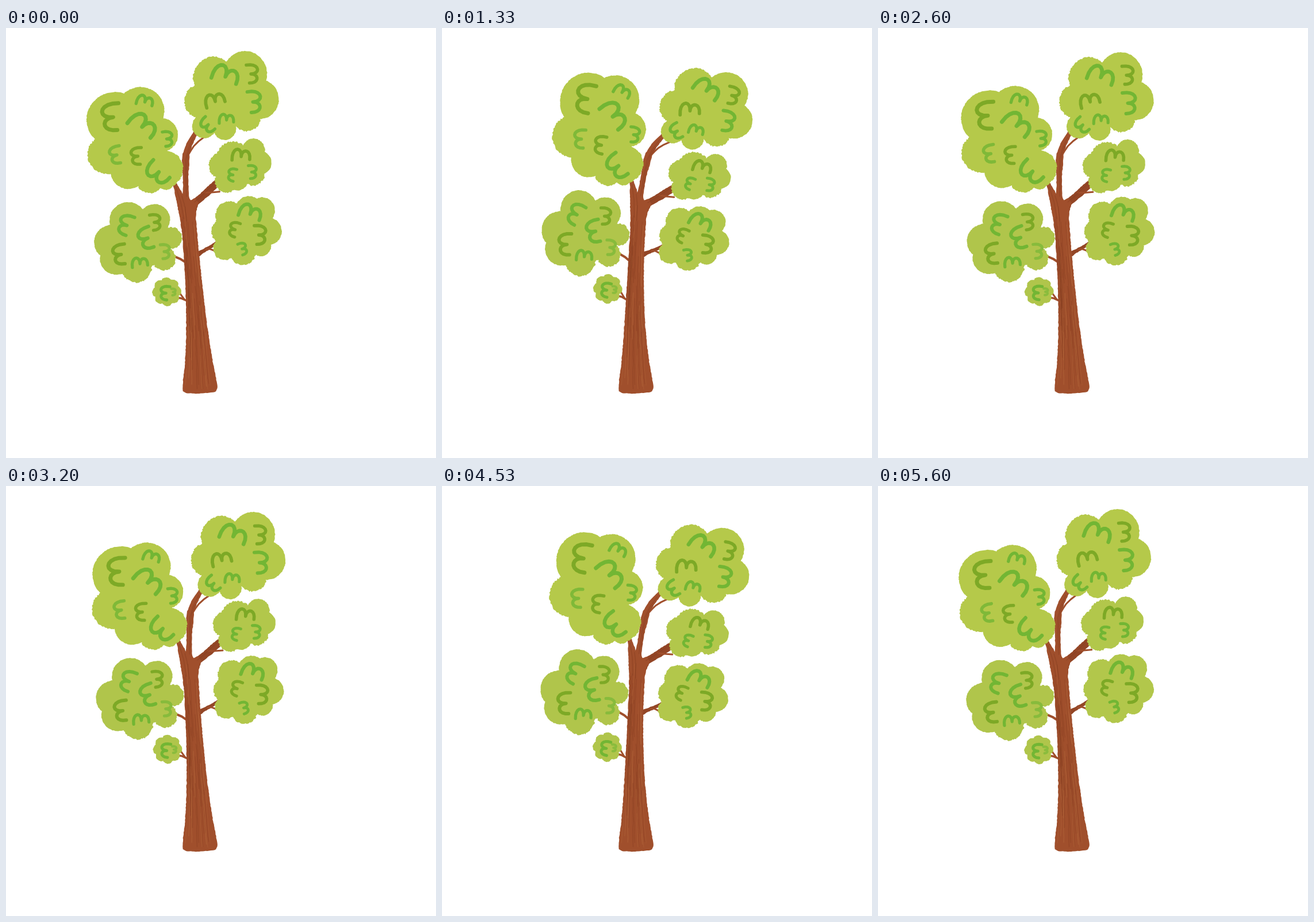
An HTML page for the animation above (5670 ms loop, 748 by 748 pixels).

```html
<!DOCTYPE html>
<html lang="en">
<head>
<meta charset="utf-8">
<title>Swaying tree</title>
<style>
html, body { margin: 0; width: 100%; height: 100%; overflow: hidden; background: #fff; }
svg { display: block; width: 100vw; height: 100vh; }
</style>
</head>
<body>
<svg id="stage" viewBox="0 0 748 748"></svg>
<script>
const FPS = 15, FRAMES = 85, SWAYS = 2;
const ROOT = { x: 337, y: 636 }, MAX_CURVE = 2.71e-4;
const BRIGHT = '#72b634', OLIVE = '#7da926', BARK = '#a04f2c', DARK_BARK = '#934626';
const stage = document.getElementById('stage');
const parts = [];

let seed = 11;
const random = () => (seed = (seed * 16807) % 2147483647) / 2147483647;
const jitter = amount => (random() - 0.5) * 2 * amount;
const lerp = (a, b, t) => a + (b - a) * t;

// Each part is a set of polylines in the upright pose, bent on every update.
function addPart(lines, attributes, closed) {
  const node = document.createElementNS('http://www.w3.org/2000/svg', 'path');
  for (const name in attributes) node.setAttribute(name, attributes[name]);
  stage.appendChild(node);
  parts.push({ node, lines, end: closed ? 'Z' : '' });
}

function addStroke(points, color, width, opacity = 1) {
  addPart([points], {
    fill: 'none', stroke: color, 'stroke-width': width, opacity,
    'stroke-linecap': 'round', 'stroke-linejoin': 'round'
  });
}

function toPoints(text) {
  return text.split(' ').map(pair => pair.split(',').map(Number));
}

function addShape(text, color) {
  const corners = toPoints(text), points = [];
  corners.forEach(([x, y], i) => {
    const [nx, ny] = corners[(i + 1) % corners.length];
    const steps = Math.max(1, Math.round(Math.hypot(nx - x, ny - y) / 3));
    for (let s = 0; s < steps; s++) {
      points.push([lerp(x, nx, s / steps) + jitter(0.5), lerp(y, ny, s / steps) + jitter(0.4)]);
    }
  });
  addPart([points], { fill: color }, true);
}

function roughCircle([x, y, r]) {
  const count = Math.round(r * 3.2), rough = random() < 0.5 ? 0.5 : 1.2;
  return Array.from({ length: count }, (_, i) => {
    const a = i / count * 2 * Math.PI, d = r + jitter(rough);
    return [x + d * Math.cos(a), y + d * Math.sin(a)];
  });
}

function addCrown(color, circles) {
  addPart(circles.map(roughCircle), { fill: color }, true);
}

function cubic(a, b, c, d, t) {
  const u = 1 - t;
  return [0, 1].map(i =>
    u * u * u * a[i] + 3 * u * u * t * b[i] + 3 * u * t * t * c[i] + t * t * t * d[i]);
}

// A brushed "m": a large arch followed by a smaller one.
const ARCHES = [
  [[-0.5, 0.28], [-0.52, -0.42], [0.06, -0.47], [0, 0.1]],
  [[0, 0.1], [0.04, -0.33], [0.54, -0.3], [0.46, 0.25]]
];
function addMark(color, x, y, size, angle, flip = 1, opacity = 1) {
  const a = angle * Math.PI / 180, cos = Math.cos(a), sin = Math.sin(a), points = [];
  for (const arch of ARCHES) {
    for (let i = 0; i <= 9; i++) {
      const [u, v] = cubic(...arch, i / 9).map(n => n * size);
      points.push([x + u * flip * cos - v * sin, y + u * flip * sin + v * cos]);
    }
  }
  addStroke(points, color, 3.2 + size * 0.075, opacity);
}

// Branches and trunk
addShape('338,300 352,291 370,277 385,266 392,272 388,278 378,287 362,299 349,308 343,322 336,320', DARK_BARK);
addShape('341,389 350,386 361,381 376,373 378,379 362,387 352,392 342,399', DARK_BARK);
addShape('307,627 308,612 311,590 314,550 316,500 317,440 317,400 317,360 316,340 313,310 309,272 ' +
  '308,262 313,263 318,274 324,287 326,270 328,232 331,217 341,198 355,181 360,186 352,200 343,216 ' +
  '341,233 336,260 334,290 336,299 344,296 350,304 345,314 343,330 343,350 344,400 346,440 350,500 ' +
  '355,545 360,580 366,612 368,627 365,632 360,634 347,635 330,636 313,635 308,632', BARK);
for (const [path, width] of [
  ['340,221 346,213 352,206 361,199 371,193', 3],
  ['362,288 374,289 388,289', 3],
  ['356,386 363,386 370,389', 3],
  ['303,396 311,400 319,406', 4],
  ['300,467 309,469 317,473', 3.5],
  ['306,459 310,465 314,471', 3]
]) addStroke(toPoints(path), BARK, width);

// Bark grain
const flare = (y, power) => Math.pow(Math.max(0, (y - 350) / 280), power);
const trunkLeft = y => 317 - 9 * flare(y, 2.5);
const trunkRight = y => 343 + 24 * flare(y, 1.6);
for (let i = 0; i < 44; i++) {
  const side = 0.06 + 0.88 * random(), top = 302 + random() * 230;
  const bottom = Math.min(630, top + 60 + random() * 150), points = [];
  for (let y = top; y <= bottom; y += 10) {
    points.push([lerp(trunkLeft(y), trunkRight(y), side) + jitter(0.5), y]);
  }
  addStroke(points, i % 3 ? '#883f22' : '#b4683c', 0.8 + random() * 0.9, 0.45);
}
for (const path of ['330,292 332,255 335,228 342,210 353,191', '333,280 335,245 339,222 347,206',
  '322,330 319,300 313,274', '327,335 325,305 322,290', '343,303 358,292 381,273']) {
  addStroke(toPoints(path), '#843d20', 1.2, 0.5);
}

// Foliage
addCrown('#b5c94a', [[221,142,49], [267,133,42], [297,180,30], [201,203,35], [234,238,31],
  [270,255,25], [296,240,33], [297,262,15], [245,185,52]]);
addCrown('#b5c94a', [[402,94,36], [457,95,38], [476,141,33], [375,131,30], [374,174,21],
  [409,182,20], [449,168,24], [425,135,46]]);
addCrown('#b2c74b', [[417,234,28], [454,225,20], [463,247,20], [449,264,20], [402,272,20],
  [421,272,18], [397,245,23], [432,248,28]]);
addCrown('#b2c74b', [[436,325,24], [402,332,25], [459,327,22], [467,363,23], [452,386,18],
  [420,394,23], [389,387,20], [390,358,22], [428,358,38]]);
addCrown('#b0c54b', [[225,324,32], [271,327,27], [297,362,19], [282,397,21], [234,411,26],
  [200,392,29], [195,362,32], [242,365,48]]);
addCrown('#b0c54b', [[284,456,21], ...Array.from({ length: 8 }, (_, i) => {
  const a = i * Math.PI / 4;
  return [284 + 16 * Math.cos(a), 456 + 16 * Math.sin(a), 9.5];
})]);

const marks = [
  [OLIVE, 214, 137, 50, -82, -1], [BRIGHT, 278, 116, 29, 18], [BRIGHT, 270, 158, 50, 42],
  [BRIGHT, 309, 188, 27, 85], [BRIGHT, 214, 206, 32, -90, -1, 0.8], [OLIVE, 250, 212, 31, -82, -1],
  [BRIGHT, 283, 247, 44, -128, -1],
  [BRIGHT, 424, 91, 46, 24], [OLIVE, 470, 97, 32, 90], [OLIVE, 398, 131, 35, -10],
  [BRIGHT, 467, 144, 37, 88], [BRIGHT, 414, 166, 26, 4], [BRIGHT, 379, 174, 28, -122, -1],
  [OLIVE, 432, 230, 32, 6], [BRIGHT, 412, 262, 22, -68, -1], [BRIGHT, 449, 261, 23, 88],
  [BRIGHT, 439, 328, 39, 20], [OLIVE, 407, 355, 26, -64, -1], [OLIVE, 453, 368, 33, 88],
  [BRIGHT, 421, 389, 21, 70],
  [BRIGHT, 219, 332, 37, -62, -1], [OLIVE, 273, 332, 29, 82], [BRIGHT, 253, 360, 39, -102, -1],
  [OLIVE, 205, 385, 37, -90, -1], [BRIGHT, 240, 401, 28, -4], [BRIGHT, 286, 385, 26, 85, 1, 0.65],
  [BRIGHT, 280, 458, 25, -76, -1], [BRIGHT, 296, 457, 12, 85, 1, 0.6]
];
for (const mark of marks) addMark(...mark);

// Bends the upright tree into a circular arc rising from its root.
function bend([x, y], curve) {
  const offset = x - ROOT.x, height = ROOT.y - y, angle = curve * height || 1e-6;
  const half = Math.sin(angle / 2);
  const bx = ROOT.x + height * 2 * half * half / angle + offset * Math.cos(angle);
  const by = ROOT.y - height * Math.sin(angle) / angle + offset * Math.sin(angle);
  return bx.toFixed(2) + ' ' + by.toFixed(2);
}

function draw(frame) {
  const phase = (frame * SWAYS / FRAMES) % 1;
  const s = 1 - Math.abs(2 * phase - 1);
  const eased = s * s * (3 - 2 * s);
  const curve = MAX_CURVE * (2 * eased - 1);
  for (const { node, lines, end } of parts) {
    node.setAttribute('d', lines.map(line =>
      'M' + line.map(point => bend(point, curve)).join('L') + end).join(''));
  }
}

let shown = -1;
function tick() {
  const frame = Math.floor(performance.now() * FPS / 1000 + 0.05) % FRAMES;
  if (frame !== shown) draw(shown = frame);
  requestAnimationFrame(tick);
}
tick();
</script>
</body>
</html>
```
